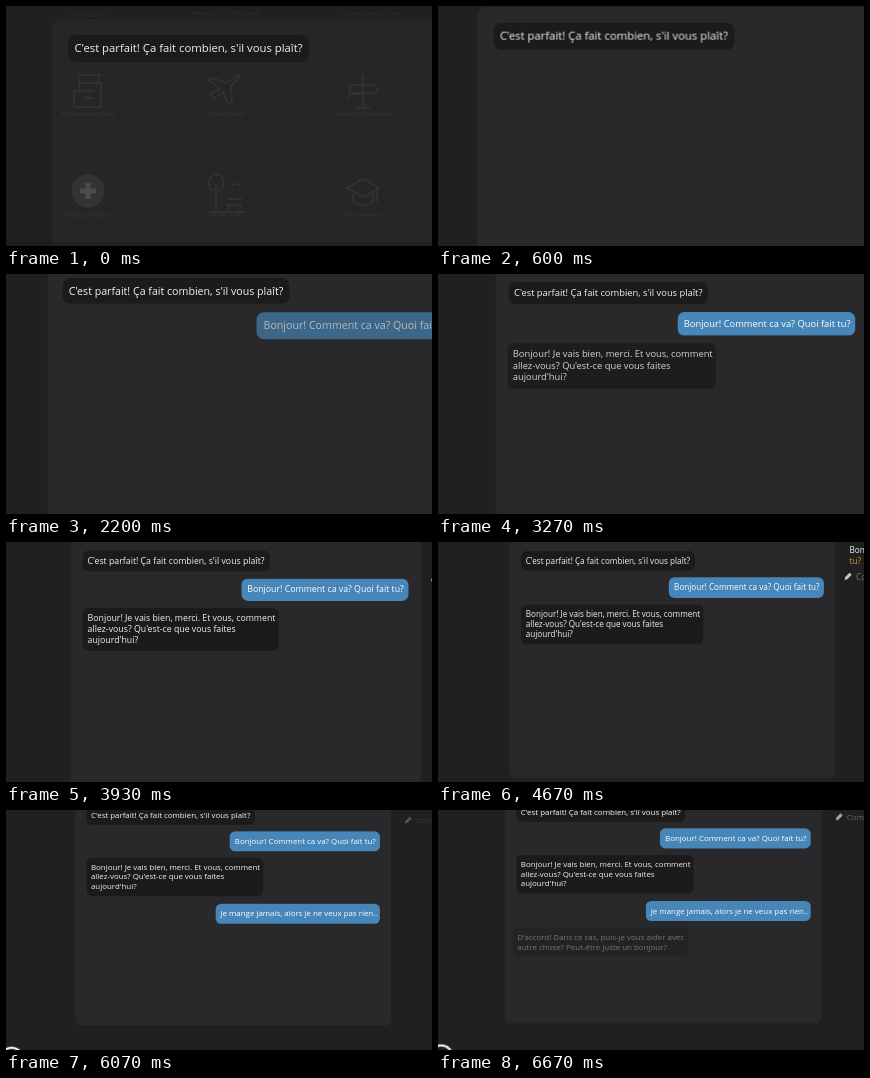
Animation of 426x240 px, one loop 6.79 s. Source, as an HTML page:

```html
<!DOCTYPE html>
<html lang="fr">
<head>
<meta charset="utf-8">
<title>Conversation</title>
<style>
  html, body { margin: 0; width: 100%; height: 100%; overflow: hidden; background: #202020; }
  svg { display: block; width: 100%; height: 100%; }
  text { font-family: "Open Sans", "Noto Sans", sans-serif; font-size: 11.3px; fill: #f2f2f2; }
  g { animation: 6790ms linear infinite; }

  .camera { animation-name: camera; }
  .menu { animation-name: menu; }
  .reply1 { --slide: 4px; animation-name: reply1; }
  .reply2 { --slide: -11px; animation-name: reply2; }
  .reply3 { --slide: 11px; animation-name: reply3; }
  .reply4 { --slide: -8px; animation-name: reply4; }
  .note1 { animation-name: note1; }
  .note2 { animation-name: note2; }

  .dark { fill: #1b1b1c; }
  .blue { fill: #4686b8; }
  .blue + text { fill: #fff; }
  .hint { fill: #777; }
  .wrong { fill: #e0982f; }
  .menu text { font-size: 5.8px; fill: #fff; fill-opacity: .07; text-anchor: middle; }
  .icons { fill: none; stroke: #fff; stroke-opacity: .06; stroke-width: 1.5; stroke-linejoin: round; }

  /* The view drifts up, then pulls back from the conversation. */
  @keyframes camera {
    0% { transform: translate(46px, 13px) scale(1); }
    10.75% { transform: translate(38px, -2px) scale(1); }
    18.7% { transform: translate(36.5px, -7px) scale(1); }
    23.56% { transform: translate(36.5px, -7.3px) scale(1); }
    32.4% { transform: translate(41.5px, -11px) scale(.942); }
    48.16% { transform: translate(57.5px, -5.2px) scale(.826); }
    68.78% { transform: translate(71.5px, -2.5px) scale(.722); }
    80.56% { transform: translate(73px, -5.9px) scale(.697); }
    86.45% { transform: translate(70px, -14.2px) scale(.699); }
    98.23%, 100% { transform: translate(67px, -18.4px) scale(.702); }
  }
  @keyframes menu {
    0%, 1% { opacity: 1; }
    7%, 100% { opacity: 0; }
  }
  @keyframes reply1 {
    0%, 25.48% { opacity: 0; transform: translateX(var(--slide)); }
    35.79%, 100% { opacity: 1; transform: none; }
  }
  @keyframes reply2 {
    0%, 39.32% { opacity: 0; transform: translateX(var(--slide)); }
    49.63%, 100% { opacity: 1; transform: none; }
  }
  @keyframes reply3 {
    0%, 76.14% { opacity: 0; transform: translateX(var(--slide)); }
    86.45%, 100% { opacity: 1; transform: none; }
  }
  @keyframes reply4 {
    0%, 94.26% { opacity: 0; transform: translateX(var(--slide)); }
    100% { opacity: .55; transform: translateX(calc(var(--slide) * .45)); }
  }
  @keyframes note1 {
    0%, 54% { opacity: 0; }
    60%, 70% { opacity: 1; }
    76%, 100% { opacity: 0; }
  }
  @keyframes note2 {
    0%, 86% { opacity: 0; }
    95%, 100% { opacity: .8; }
  }
</style>
</head>
<body>
<svg viewBox="0 0 426 240" preserveAspectRatio="none">
  <defs>
    <path id="pencil" d="M0 10l1-4 6-6 3 3-6 6z" fill="#c4c4c4"/>
  </defs>
  <rect width="426" height="240" fill="#202020"/>

  <g class="camera">
    <rect width="451.5" height="330" rx="9" fill="#29292b"/>
    <circle cx="-91" cy="378" r="16.5" fill="none" stroke="#fff" stroke-width="3"/>
  </g>

  <g class="menu">
    <path d="M0 236H426V240H0z" fill="#1b1e1b" fill-opacity=".7"/>
    <path d="M46 13H426V236H46z" fill-opacity=".05"/>
    <path d="M46 143H426M153 13V236M288 13V236" stroke="#222224" stroke-width="7" stroke-opacity=".15"/>
    <g class="icons">
      <path d="M72 69h22l-3 8h4v24H68V85h6zM76 85h12M78 92h9M74 77h17"/>
      <path d="M204 88l10-5-12-9 4-2 15 5 10-7q4-2 3 1l-9 9 1 16-4 2-5-12-9 6z"/>
      <path d="M357 69v33M344 79h24l4 4-4 4h-24zM340 92l5-4h12M350 102h14"/>
      <path d="M203 206h36M205 171q6-5 11 0 5 7-2 13h-8q-6-6-1-13M210 178v26M220 199h16M222 193h14M223 199v6M234 199v6M225 180q6-5 10 1"/>
      <path d="M341 182l16-9 16 9-16 9zM347 187v9q10 7 20 0v-9M371 184v12"/>
    </g>
    <circle cx="82" cy="185" r="16.5" fill="#fff" fill-opacity=".06"/>
    <path d="M82 177v16M74 185h16" stroke="#fff" stroke-width="5" stroke-opacity=".12"/>
    <text x="82" y="11">At the Gallery</text>
    <text x="220" y="9">Asking for the Time Table</text>
    <text x="365" y="9">Checking into a Hotel</text>
    <text x="82" y="110">At the Grocery Store</text>
    <text x="220" y="110">At the Airport</text>
    <text x="358" y="110">Asking for Directions</text>
    <text x="82" y="211">Visiting a Doctor</text>
    <text x="220" y="211">At the Park</text>
    <text x="357" y="211">At a University</text>
  </g>

  <g class="camera">
    <rect class="dark" x="16" y="16" width="241" height="27" rx="8"/>
    <text x="22.5" y="33.5">C'est parfait! Ça fait combien, s'il vous plaît?</text>

    <g class="reply1">
      <rect class="blue" x="220.6" y="52.3" width="214.9" height="28.6" rx="8"/>
      <text x="228" y="70">Bonjour! Comment ca va? Quoi fait tu?</text>
    </g>

    <g class="reply2">
      <rect class="dark" x="16" y="90" width="252.5" height="55" rx="8"/>
      <text y="107">
        <tspan x="22.5">Bonjour! Je vais bien, merci. Et vous, comment</tspan>
        <tspan x="22.5" dy="14">allez-vous? Qu'est-ce que vous faites</tspan>
        <tspan x="22.5" dy="14">aujourd'hui?</tspan>
      </text>
    </g>

    <g class="reply3">
      <rect class="blue" x="200.6" y="155.8" width="234.9" height="28.6" rx="8"/>
      <text x="207.5" y="174">Je mange jamais, alors je ne veux pas rien..</text>
    </g>

    <g class="reply4">
      <rect class="dark" x="16" y="194" width="249.5" height="40" rx="8"/>
      <text y="211">
        <tspan x="22.5">D'accord! Dans ce cas, puis-je vous aider avec</tspan>
        <tspan x="22.5" dy="14">autre chose? Peut-être juste un bonjour?</tspan>
      </text>
    </g>

    <g class="note1">
      <text x="471" y="18.5">Bonjour! Comment ça va? Que fais-</text>
      <text class="wrong" x="471" y="34">tu?</text>
      <use href="#pencil" x="464" y="46"/>
      <text class="hint" x="480" y="56">Comment</text>
    </g>
    <g class="note2">
      <use href="#pencil" x="471" y="31"/>
      <text class="hint" x="487" y="40">Comment</text>
    </g>
  </g>
</svg>
</body>
</html>
```
